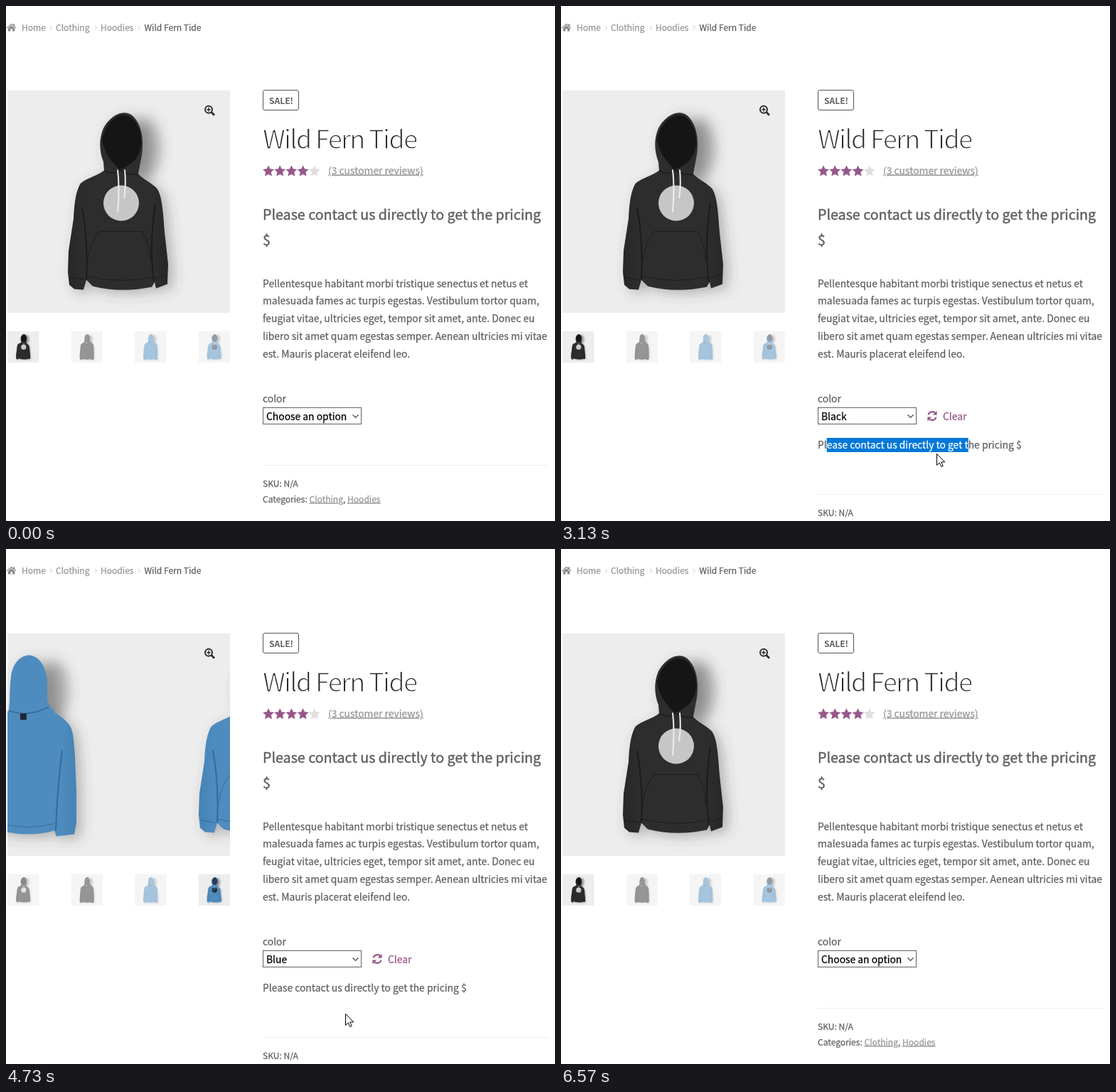
Write an HTML page that moves like this. It is 772 by 725 pixels and loops after 6.81 s.

```html
<!DOCTYPE html>
<html lang="en">
<head>
<meta charset="utf-8">
<title>Product page</title>
<style>
html, body { margin: 0; width: 100%; height: 100%; overflow: hidden; background: #fff; }
svg { display: block; width: 772px; height: 725px; }
text {
  font-family: "Noto Sans CJK SC", "Noto Sans CJK JP", "Noto Sans CJK", "Open Sans", sans-serif;
  font-kerning: normal; white-space: pre;
  color: #606060; fill: currentColor; stroke: currentColor; stroke-width: .25px;
}
.link { color: #969696; fill: #969696; stroke: #969696; text-decoration: underline; text-decoration-thickness: 1px; }
.price { stroke-width: .45px; }
/* a white outline thins the regular weight into a light one */
.title { color: #2b2b2b; stroke: #fff; stroke-width: 1.3px; letter-spacing: -1.75px; }
</style>
</head>
<body>
<svg id="stage" viewBox="0 0 772 725" xmlns="http://www.w3.org/2000/svg"></svg>
<script>
const LOOP = 6810, PIC = 313, BASE = 15.52, SMALL = 13.5, PRICE = 22, TITLE = 40.6;
const NAME = 'Wild Fern Tide';
const NOTE = 'Please contact us directly to get the pricing $';
const OPTIONS = ['Choose an option', 'Black', 'Blue'];
const PURPLE = '#96588a', MARK = '#0078d7';

// size is in Source Sans units; the CJK family draws the same Latin letters larger
const text = (x, y, str, size = BASE, attrs = '') =>
  `<text x="${x}" y="${y}" font-size="${(size / 1.119).toFixed(2)}" ${attrs}>${str}</text>`;

const star = (cx, cy, r, fill) => {
  const pts = Array.from({ length: 10 }, (_, i) => {
    const a = Math.PI * (i / 5 - 0.5), d = i % 2 ? r * 0.48 : r;
    return (cx + d * Math.cos(a)).toFixed(2) + ',' + (cy + d * Math.sin(a)).toFixed(2);
  });
  return `<polygon points="${pts.join(' ')}" fill="${fill}"/>`;
};

// Hoodie pictures, 313 px square
const FRONT = `M162 32 C151 33 139 44 134 56 C128 72 130 88 135 101 L136 113
  C127 120 113 123 103 131 C96 142 94 160 93 181 L86 226 L85 256 L87 274 L94 280 L107 281
  L111 267 L120 276 Q160 286 203 277 L207 270 L209 279 L225 273 L226 245 L221 200
  C219 170 217 145 209 137 C200 129 192 126 184 118 L189 91 C192 70 189 48 176 36 Q169 31 162 32 Z`;
const BACK = `M159 31 C145 32 136 45 134 61 C132 77 133 92 131 109 L121 115
  C105 122 97 130 94 143 L87 218 L85 266 L89 282 L109 285 L112 276 Q156 289 195 278
  L198 286 L223 283 L226 268 L226 222 L224 172 C222 146 221 136 216 129 Q208 119 196 112
  L187 100 C183 90 187 76 184 60 C181 43 171 31 159 31 Z`;

function hoodie(id, back, c) {
  const shape = back ? BACK : FRONT;
  const seam = (d, w = 1) => `<path d="${d}" fill="none" stroke="${c.dark}" stroke-width="${w}"/>`;
  const details = back
    ? seam('M131 109 Q158 119 187 104', 1.5) + seam('M108 160 Q114 215 110 275', 2) +
      seam('M206 165 Q199 220 197 278', 2) + seam('M112 266 Q156 279 195 268') +
      `<rect x="147" y="113" width="9" height="9" fill="${c.print}"/>`
    : `<path d="M162 35 C149 37 138 49 133 69 Q136 92 158 112 Q185 102 188 78 C190 55 178 34 162 35 Z" fill="${c.inner}"/>` +
      seam('M105 165 Q114 215 111 267', 2) + seam('M208 160 Q199 220 206 270', 2) +
      seam('M129 199 H190 M129 199 Q117 214 113 238 M190 199 Q200 217 202 240') +
      seam('M112 262 Q160 273 204 263') + seam('M87 263 L109 267 M208 265 L225 259') +
      seam('M136 113 Q148 121 158 112 Q172 121 184 118', 1.5) +
      `<circle cx="160" cy="159" r="25" fill="${c.print}"/>
       <path d="M155 112 Q158 136 155 172 M165 112 Q167 133 164 152" fill="none" stroke="#eee" stroke-width="2"/>`;
  return `<linearGradient id="${id}-tone">
      <stop offset="0" stop-color="${c.edge}"/><stop offset=".15" stop-color="${c.main}"/>
      <stop offset=".85" stop-color="${c.main}"/><stop offset="1" stop-color="${c.edge}"/></linearGradient>
    <g id="${id}"><rect width="313.5" height="313.5" fill="#ededed"/>
      <g fill="#444" filter="url(#soft)"><path d="${shape}" transform="translate(7 5)" opacity=".35"/>
        <ellipse cx="194" cy="82" rx="21" ry="44" opacity=".42"/></g>
      <path d="${shape}" fill="url(#${id}-tone)"/>${details}</g>`;
}
const black = { main: '#2d2d2e', edge: '#272728', dark: '#1c1c1d', inner: '#151516', print: '#c6c6c6' };
const blue = { main: '#4e8cbf', edge: '#4682b3', dark: '#376a94', inner: '#263c50', print: '#1f2932' };
const PICS = ['black-front', 'black-back', 'blue-back', 'blue-front'];

const refreshIcon = `<g fill="none" stroke="currentColor" stroke-width="2.2">
  <path d="M516.5 575.5 A5.8 5.8 0 0 1 526.5 573.2 M527.5 578.8 A5.8 5.8 0 0 1 517.5 581"/></g>
  <path d="M528.6 570 V575.8 H522.8 Z M515.4 584.4 V578.6 H521.2 Z" fill="currentColor"/>`;

const crumbs = [[22, 'Home'], [70, 'Clothing'], [133, 'Hoodies']];
const lines = [
  'Pellentesque habitant morbi tristique senectus et netus et',
  'malesuada fames ac turpis egestas. Vestibulum tortor quam,',
  'feugiat vitae, ultricies eget, tempor sit amet, ante. Donec eu',
  'libero sit amet quam egestas semper. Aenean ultricies mi vitae',
  'est. Mauris placerat eleifend leo.'
];

const stage = document.getElementById('stage');
stage.innerHTML = `
<defs>
  <filter id="soft" x="-30%" y="-30%" width="160%" height="160%"><feGaussianBlur stdDeviation="9"/></filter>
  <clipPath id="frame"><rect x="2" y="118.5" width="313" height="313.5"/></clipPath>
  <clipPath id="thumb"><rect width="313" height="313" rx="12"/></clipPath>
  <clipPath id="reveal"><rect id="revealBox" x="355" y="600" width="410" height="0"/></clipPath>
  <clipPath id="picked"><rect id="pickedBox" y="608" height="20"/></clipPath>
  ${hoodie(PICS[0], false, black)}${hoodie(PICS[1], true, black)}
  ${hoodie(PICS[2], true, blue)}${hoodie(PICS[3], false, blue)}
</defs>
<rect width="772" height="725" fill="#fff"/>

<path d="M1 30.6 L7.7 24.6 L10.5 27.1 V25.2 H12.3 V28.7 L14.4 30.6 L13.6 31.5 L7.7 26.3 L1.8 31.5 Z
  M3 31.5 L7.7 27.3 L12.4 31.5 V35.5 H9 V32.2 H6.4 V35.5 H3 Z" fill="#8c8c8c"/>
${crumbs.map(([x, s]) => text(x, 35, s, SMALL, 'style="color:#969696"')).join('')}
${[62, 125, 186].map(x => `<path d="M${x} 27.5 l2.5 3 l-2.5 3" fill="none" stroke="#c8c8c8"/>`).join('')}
${text(194.5, 35, NAME, SMALL)}

<g clip-path="url(#frame)"><g id="strip">
  ${PICS.map((p, i) => `<use href="#${p}" x="${i * PIC}"/>`).join('')}
</g></g>
<g fill="none" stroke="#2f2f2f"><circle cx="285" cy="145.7" r="5" stroke-width="2"/>
  <path d="M288.8 149.5 L293 153.7" stroke-width="2.8"/><path d="M282.3 145.7 h5.4 M285 143 v5.4" stroke-width="1.5"/></g>
${PICS.map((p, i) => `<g class="thumb" transform="translate(${2 + i * 89.5} 457.5) scale(.1425)">
  <g clip-path="url(#thumb)"><use href="#${p}"/></g></g>`).join('')}

<rect x="361.5" y="118.5" width="50" height="28" rx="2.5" fill="none" stroke="#555"/>
${text(370, 138, 'SALE!', SMALL, 'font-weight="600" style="stroke:none"')}
${text(361, 200.7, NAME, TITLE, 'class="title"')}
${[0, 1, 2, 3, 4].map(i => star(369 + i * 16.2, 232.6, 8.4, i < 4 ? PURPLE : '#dfdfdf')).join('')}
${text(453, 236.5, '(3 customer reviews)', BASE, 'class="link"')}
${text(361, 301, NOTE.slice(0, -2), PRICE, 'class="price"')}${text(361, 336.5, '$', PRICE, 'class="price"')}
${lines.map((s, i) => text(361, 395.5 + i * 24.95, s)).join('')}
${text(361, 558, 'color')}

<rect x="361.5" y="565.5" width="138" height="23" fill="#fff" stroke="#606060"/>
${text(366, 582.5, '', BASE, 'id="choice" style="color:#000"')}
<path d="M487.5 575.5 l4 4 l4 -4" fill="none" stroke="#444" stroke-width="1.2"/>
<g id="clear">${refreshIcon}${text(537, 582.5, 'Clear', BASE, 'style="color:inherit"')}</g>

<g clip-path="url(#reveal)">
  ${text(361, 623, NOTE, BASE, 'id="note"')}
  <g clip-path="url(#picked)"><rect x="361" y="608" width="300" height="20" fill="${MARK}"/>
    ${text(361, 623, NOTE, BASE, 'style="color:#fff"')}</g>
</g>
<g id="meta">
  <path d="M361 646.5 H764" stroke="#efefef"/>
  ${text(361, 676.5, 'SKU: N/A', SMALL)}
  ${text(361, 698.5, 'Categories: <tspan class="link">Clothing</tspan>, <tspan class="link">Hoodies</tspan>', SMALL)}
</g>

<g id="popup"><rect x="360.5" y="589" width="139" height="71.5" fill="#fff" stroke="#767676"/>
  <rect id="row" x="361" width="138" height="23.6" fill="${MARK}"/>
  ${OPTIONS.map((s, i) => text(366, 606 + i * 23.7, s, BASE, 'class="option"')).join('')}
</g>

<g id="cursor">
  <path id="arrow" d="M.5 .5 V16.5 L4.2 13 L6.8 18.6 L9.2 17.5 L6.7 12 H11.8 Z" fill="#fff" stroke="#000"/>
  <path id="beam" d="M-3 -8.5 H-1 L0 -7.5 L1 -8.5 H3 M0 -7.5 V7.5 M-3 8.5 H-1 L0 7.5 L1 8.5 H3" fill="none" stroke="#000"/>
  <path id="hand" d="M-1.7 1.8 Q-1.7 0 0 0 Q1.7 0 1.7 1.8 V7 Q4.5 5.8 5 8 Q7.4 7 7.7 9.2 Q10 8.6 10 11
    V15.5 Q10 18 8.3 20 V22.5 H-1.5 V20.3 L-6 13.3 Q-6.8 11.3 -5 10.8 Q-3.5 10.8 -1.7 13.5 Z
    M1.7 7 V11 M5 8 V11.5 M7.7 9.2 V12" fill="#fff" stroke="#000" stroke-width="1.1"/>
</g>`;

const $ = id => document.getElementById(id);
const thumbs = document.querySelectorAll('.thumb'), optionTexts = document.querySelectorAll('.option');
const clamp = v => Math.min(1, Math.max(0, v));
const ramp = (t, from, len) => clamp((t - from) / len);
const swing = p => 0.5 - Math.cos(p * Math.PI) / 2;
const within = (t, a, b) => t >= a && t < b;
const show = (el, on) => el.setAttribute('visibility', on ? 'visible' : 'hidden');

const ENTER = 600, EXIT = 6400, PICK_BLACK = 2000, PICK_BLUE = 4430, RESET = 5990;
const path = [ // time, x, y of the pointer
  [ENTER, 683, 516], [1080, 462, 577], [1300, 462, 577], [1800, 440, 626], [1980, 440, 626],
  [2100, 438, 638], [2300, 373, 619], [2360, 373, 618], [2680, 482, 619], [3060, 574, 622],
  [3130, 528, 630], [3370, 480, 634], [3700, 452, 578], [3900, 452, 578], [4300, 446, 648],
  [4500, 446, 648], [4730, 477, 654], [5490, 533, 590], [5530, 537, 584], [6000, 537, 584],
  [6320, 1, 690], [EXIT, 8, 728]
];

function pointer(t) {
  const i = path.findIndex(k => k[0] > t);
  if (i < 1) return path[i ? path.length - 1 : 0].slice(1);
  const [a, b] = [path[i - 1], path[i]], p = swing((t - a[0]) / (b[0] - a[0]));
  return [a[1] + (b[1] - a[1]) * p, a[2] + (b[2] - a[2]) * p];
}

// right edge of the letter nearest to x
function letterEdge(x) {
  let best = 361;
  for (let n = 2; n <= NOTE.length; n++) {
    const edge = 361 + $('note').getSubStringLength(0, n);
    if (Math.abs(edge - x) < Math.abs(best - x)) best = edge;
  }
  return best;
}

function draw(t) {
  const [x, y] = pointer(t);

  const open = swing(ramp(t, PICK_BLACK + 5, 150)) - swing(ramp(t, RESET + 15, 150));
  const drop = Math.round(41 * open);
  $('revealBox').setAttribute('height', drop);
  $('meta').setAttribute('transform', `translate(0 ${drop})`);

  const fade = ramp(t, 2060, 140) - ramp(t, RESET, 140);
  const mix = (a, b) => Math.round(a + (b - a) * fade);
  $('clear').setAttribute('opacity', fade);
  $('clear').setAttribute('color', `rgb(${mix(136, 150)},${mix(136, 88)},${mix(136, 138)})`);

  const choice = within(t, PICK_BLACK, PICK_BLUE) ? 1 : within(t, PICK_BLUE, RESET) ? 2 : 0;
  $('choice').textContent = OPTIONS[choice];

  const isOpen = within(t, 1180, PICK_BLACK) || within(t, 3800, PICK_BLUE);
  show($('popup'), isOpen);
  const hover = y > 590 ? Math.min(2, Math.floor((y - 589) / 23.7)) : choice;
  $('row').setAttribute('y', 589.5 + hover * 23.7);
  optionTexts.forEach((el, i) => { el.style.color = i === hover ? '#fff' : '#000'; });

  const start = 361 + $('note').getSubStringLength(0, 2);
  const end = within(t, 2400, 3400) ? letterEdge(pointer(t - 70)[0]) : start;
  $('pickedBox').setAttribute('x', start);
  $('pickedBox').setAttribute('width', Math.max(0, end - start));

  const slide = swing(ramp(t, 4469, 370)) - swing(ramp(t, 6165, 370));
  $('strip').setAttribute('transform', `translate(${2 - 3 * PIC * slide} 118.5)`);
  const active = ramp(t, 4495, 150) - ramp(t, 6175, 150);
  thumbs.forEach((el, i) => {
    const lit = i === 0 ? 1 - active : i === 3 ? active : 0;
    el.setAttribute('opacity', 0.5 + lit / 2);
  });

  const shown = within(t, ENTER, EXIT);
  const onClear = shown && fade > 0.5 && within(x, 515, 572) && within(y, 566, 589);
  const onNote = shown && !isOpen && drop > 20 && within(x, 361, 648) && within(y, 607, 628);
  show($('hand'), onClear);
  show($('beam'), onNote);
  show($('arrow'), shown && !onClear && !onNote);
  $('cursor').setAttribute('transform', `translate(${Math.round(x)} ${Math.round(y)})`);
}

const begin = performance.now();
function tick() {
  draw((performance.now() - begin) % LOOP);
  requestAnimationFrame(tick);
}
tick();
</script>
</body>
</html>
```
